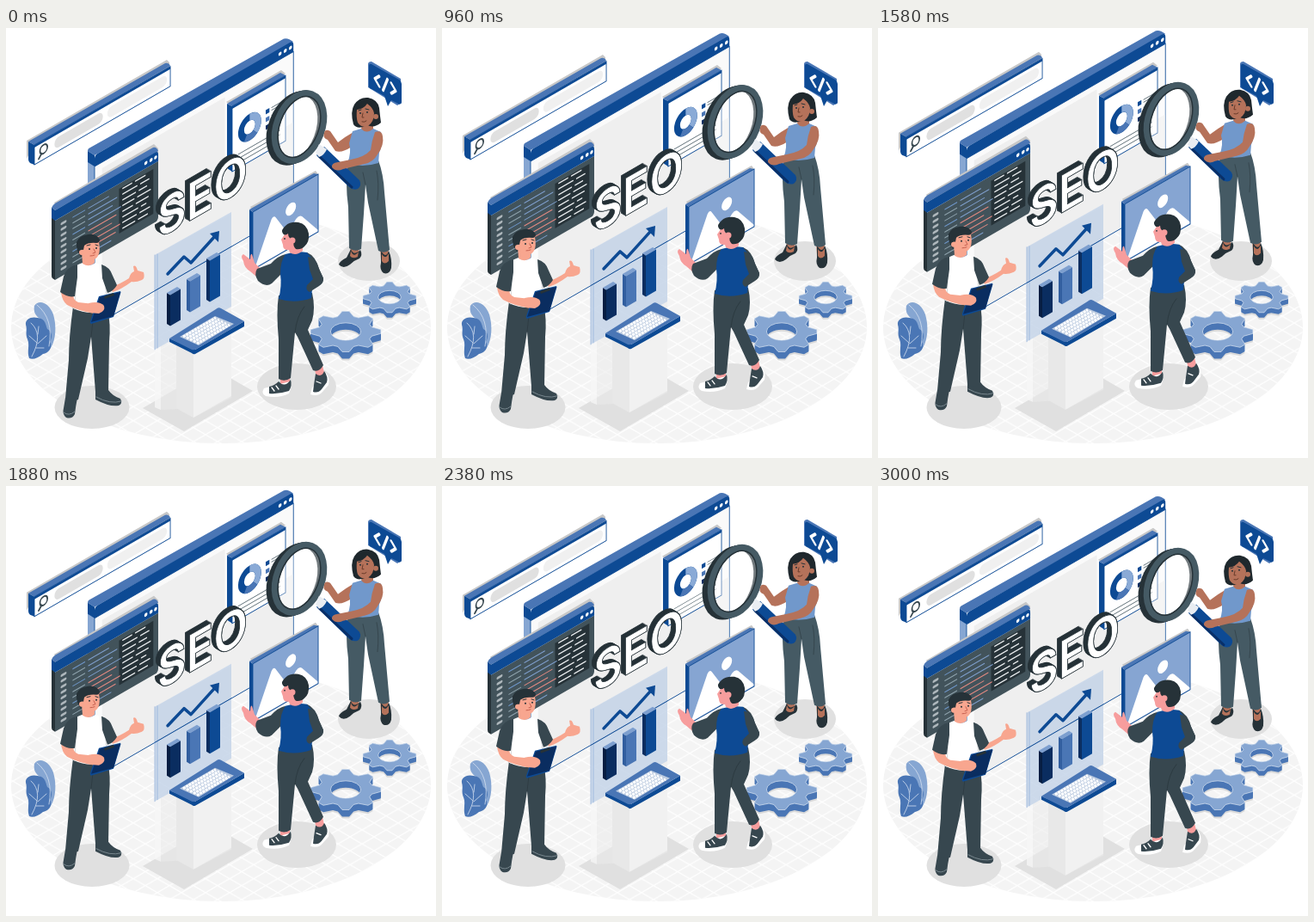
Recreate the animation shown at these times as an HTML page. Size 500 px wide and 500 px high, loop 3.04 s.

```html
<!DOCTYPE html>
<html lang="en">
<head>
<meta charset="utf-8">
<title>Floating SEO team</title>
<style>
html, body { margin: 0; width: 100%; height: 100%; overflow: hidden; background: #fff }
svg { display: block; width: 100vw; height: 100vh }
.b { fill: #0d4a94 } .m { fill: #4a76b5 } .l { fill: #86a6d2 } .n { fill: #0a2d60 }
.d { fill: #37474f } .k { fill: #263238 } .g { fill: #c7c7c7 } .s { fill: #e0e0e0 } .w { fill: #fff }
.peach { fill: #f8a68f } .pink { fill: #f79d9d } .brown { fill: #b5725a }
.edge { stroke: #0d4a94; stroke-width: 1 }
.line { fill: none; stroke-linecap: round; stroke-linejoin: round }
.ink { stroke: #263238; stroke-width: 1 }
.seo { font: 600 60px Inter, Arial, sans-serif }
</style>
</head>
<body>
<svg viewBox="0 0 500 500">
<defs>
  <pattern id="grid" width="28" height="16.2" patternUnits="userSpaceOnUse" x="8" y="3">
    <path d="M0 0L28 16.2M28 0L0 16.2" stroke="#fff" stroke-width="1.1"/>
  </pattern>
</defs>

<ellipse cx="250" cy="348" rx="244" ry="135" fill="#f4f4f4"/>
<ellipse cx="250" cy="348" rx="244" ry="135" fill="url(#grid)"/>
<g class="s">
  <ellipse cx="100" cy="441" rx="43.500" ry="25"/>
  <ellipse cx="338" cy="417" rx="46" ry="27"/>
  <ellipse cx="422" cy="271" rx="36" ry="23"/>
  <path d="M159 442L207 469L287 422L240 395Z"/>
</g>

<g id="gears"></g>

<g id="plant">
  <path class="l" d="M33 323C38 315 50 319 55 333C59 347 58 362 52 372L47 374C50 355 44 340 38 337C33 333 32 328 33 323Z"/>
  <path class="m" d="M27 384C24 376 28 369 25 362C22 355 25 351 23 345C22 338 30 335 37 337C46 338 46 345 48 350C54 353 54 360 51 365C55 372 49 378 43 379C37 384 31 386 27 384Z"/>
  <path class="line" d="M29 343Q44 356 30 382M37 356L38 347M37 367L47 358M35 372L44 372M36 366L27 358M36 322Q56 338 50 370" stroke="#d5e0f0" stroke-width=".8"/>
</g>

<g id="bubble">
  <path class="m" d="M421 42Q421 39 425 39L459 59L460 87L455 90L421 69Z"/>
  <path class="b" d="M422 44Q422 41 425 42L457 60Q460 62 460 65V85Q460 90 456 88L448 84L444 91L440 79L425 71Q422 70 422 67Z"/>
  <path class="line" transform="matrix(.866 .5 0 1 441 66)" d="M-8 -6L-14 0L-8 6M8 -6L14 0L8 6M3 -8L-3 8" stroke="#fff" stroke-width="3.200"/>
</g>

<g id="float">
  <!-- browser window -->
  <path class="l" d="M95 143L103 148V346L95 341Z"/>
  <path class="b" d="M95 143L103 148V161L95 156Z"/>
  <path class="m" d="M103 148L95 143Q95 140 98 139L323 12.500Q328 11 334 16Z"/>
  <g transform="matrix(.866 -.5 0 1 103 148)">
    <path class="edge" fill="#fafafa" d="M0 13H267V198H0Z"/>
    <path fill="#efefef" d="M10 20H175V95H266V197H10Z"/>
    <path class="b" d="M0 13V4Q0 0 4 0H262Q267 0 267 5V13Z"/>
    <g class="w"><circle cx="249" cy="6.500" r="2.100"/><circle cx="256" cy="6.500" r="2.100"/><circle cx="263" cy="6.500" r="2.100"/></g>
  </g>

  <!-- search bar -->
  <path class="g" d="M24 131L187 37L190 40V48L30 140L24 152Z"/>
  <path class="b" d="M26 132L33 136V159L28 157Q26 155 26 153Z"/>
  <path class="m" d="M26 132L185 41Q189 40 191 44L33 136Z"/>
  <g transform="matrix(.866 -.5 0 1 33 136)">
    <path class="w edge" d="M0 0H182.500V23H0Z"/>
    <path class="b" d="M0 0H182.500V3H0Z"/>
    <rect class="s" x="27" y="6.500" width="65" height="12.500" rx="6"/>
    <rect x="98" y="6.500" width="80" height="12.500" rx="6" fill="#f0f0f0"/>
    <circle cx="12.500" cy="11" r="5" fill="none" stroke="#37474f" stroke-width="2"/>
    <path class="line" d="M9.500 15L6 19" stroke="#37474f" stroke-width="2.500"/>
  </g>

  <!-- chart card -->
  <path class="g" d="M256 86L320 49L325 53L263 91Z"/>
  <path class="b" d="M257 88L263 91V167L257 163Z"/>
  <path class="m" d="M257 88L319 52L325 55L263 91Z"/>
  <g transform="matrix(.866 -.5 0 1 263 91)">
    <path class="w edge" d="M0 0H71.600V76H0Z"/>
    <path class="b" d="M0 0H71.600V3H0Z"/>
    <g fill="none" stroke-width="8">
      <circle cx="23.500" cy="36" r="11.500" stroke="#0d4a94"/>
      <path d="M23.500 24.500A11.500 11.500 0 0 1 31 44.700" stroke="#8aaad6"/>
      <path d="M31 44.700A11.500 11.500 0 0 1 18 46" stroke="#4a76b5"/>
    </g>
    <path class="b" d="M45 27h5v5h-5z"/><path class="m" d="M45 36h5v5h-5z"/><path class="n" d="M45 45h5v5h-5z"/>
    <path class="line" d="M53 28H67M53 31H63M53 37H67M53 40H64M53 46H67M53 49H62M8 60H64M8 65H64M8 70H52" stroke="#62727a" stroke-width=".9"/>
  </g>

  <!-- code window -->
  <path class="g" d="M56 203L172 135L177 140V150L60 210Z"/>
  <path class="k" d="M53 209L57 212V293L54 291Q53 290 53 288Z"/>
  <path class="b" d="M53 209L57 212V224L53 221Z"/>
  <path class="m" d="M57 212L53 209Q54 206 57 204L171 139Q175 138 177 143Z"/>
  <g transform="matrix(.866 -.5 0 1 57 212)">
    <path fill="#42535b" d="M0 12H138.600V77Q138 81 135 81H0Z"/>
    <path class="b" d="M0 0H135Q138.600 0 138.600 4V12H0Z"/>
    <g class="w"><circle cx="122" cy="6" r="2.100"/><circle cx="129" cy="6" r="2.100"/><circle cx="135" cy="6" r="2"/></g>
    <path class="k" d="M86 18h46v52h-46z"/>
    <g id="code" class="line"></g>
  </g>

  <!-- image card -->
  <path class="g" d="M284 208L360 166L363 170L287 214Z"/>
  <path class="b" d="M283 211L287 214V281L283 278Z"/>
  <path class="m" d="M283 211L358 169L363 170L287 214Z"/>
  <g transform="matrix(.866 -.5 0 1 287 214)">
    <path class="edge" fill="#86a5d2" d="M0 0H87.800V67H0Z"/>
    <path class="w" d="M3 66L25 21Q28 17 31 22L47 48L58 37Q62 34 66 38L87 64V66Z"/>
    <circle class="w" cx="51" cy="22" r="7"/>
  </g>

  <!-- stand -->
  <path fill="#ececec" fill-opacity=".55" d="M173 264L262 216V430L218 453L200 443L180 444L173 441Z"/>
  <path fill="#f1f1f1" d="M218 372L262 346V428L218 453Z"/>
  <path fill="#e8e8e8" d="M198 362L218 373V453L198 442Z"/>
  <path fill="#fff" fill-opacity=".45" d="M173 373L180 370V444L173 441Z"/>
  <path fill="#a9c4e6" fill-opacity=".5" d="M173 264L262 214V324L173 374Z"/>
  <path class="line" d="M173 264V374M176 263V372" stroke="#98b4dc" stroke-width=".8"/>
  <path class="line" d="M173 305.600L262 254.200" stroke="#0d4a94"/>
  <g id="bars"></g>
  <path class="line" d="M188 286L207 266L215 273L243 242" stroke="#0d4a94" stroke-width="3.500" stroke-linejoin="miter"/>
  <path class="b" d="M237 239L248 236L247 249Z"/>
  <path class="b" d="M190 361L220 374L277 341V347L220 379Q218 380 216 378L190 365Z"/>
  <path class="m" d="M190 361L244 327Q247 324 250 326L277 341L222 373Q219 375 216 374Z"/>
  <path fill="#bccbe0" d="M202 359L243 335L265 344L224 369Z"/>
  <path d="M206 359L244 337M210 361L248 339M214 363L252 341M218 365L256 343M222 367L260 345" fill="none" stroke="#fff" stroke-width="3" stroke-dasharray="3 .8"/>

  <g id="seo" class="seo"></g>

  <!-- man -->
  <path class="peach" d="M121 302Q134 297 143 291Q145 284 149 283L148 277Q151 275 153 282L160 284Q162 291 158 293Q151 296 146 295Q134 304 124 307Z"/>
  <path class="d" d="M69 430L83 430Q81 440 80 449Q77 455 70 453Q65 449 67 442ZM104 422L119 421Q124 428 133 431Q136 437 131 439Q121 441 104 432Z"/>
  <path class="line" d="M67 447Q73 452 80 446M105 429Q121 438 134 434" stroke="#77868d" stroke-width="1"/>
  <path class="d" d="M78 324L118 326Q122 344 120 365L119 423Q111 429 104 423L99 359L95 384L84 432Q76 435 69 431L73 386Q73 360 78 324Z"/>
  <path class="line ink" d="M99 359L101 341" opacity=".5"/>
  <path class="w" d="M89 273Q82 275 79 279L78 326Q97 335 117 328L116 301Q120 291 113 277L104 273Q97 279 89 273Z"/>
  <path class="line" d="M81 304L80 327M116 302Q117 318 116 327" stroke="#d9d9d9" stroke-width="1"/>
  <path class="peach" d="M88 260H103V273Q97 279 89 274Z"/>
  <path class="peach" d="M64 307L79 310Q77 316 84 319L103 321Q114 321 115 327Q113 334 103 332Q84 329 71 322Q65 317 64 307Z"/>
  <path class="d" d="M83 275Q71 277 67 289L63 307Q72 314 80 312L83 290ZM111 275Q121 278 124 288L129 299Q125 306 118 308L112 291Z"/>
  <path class="peach" d="M87 250Q95 244 108 249Q110 260 107 265Q103 271 97 269Q90 267 88 260Z"/>
  <path class="k" d="M88 267Q81 259 82 249Q85 241 96 240Q105 239 109 246Q109 250 105 250Q96 249 91 253L90 258Q86 257 87 262Z"/>
  <circle class="peach" cx="88" cy="261" r="3"/>
  <circle class="k" cx="97" cy="257" r="1"/><circle class="k" cx="105" cy="256" r="1"/>
  <path class="line ink" d="M94 253L98 252M104 252L107 253"/>
  <path class="line" d="M102 257L104 261L101 262M98 265Q101 265 103 264" stroke="#c6604f" stroke-width="1"/>
  <path class="b" d="M108 312L133 306Q134 307 133 309L125 336L99 344Q97 343 98 341Z"/>
  <path class="n" d="M109 313L133 307L125 335L99 342Z"/>
  <path class="k" d="M114 312L125 308L126 311L115 315Z"/>
  <path class="peach" d="M96 320Q109 317 114 323Q116 329 108 332L97 331Z"/>

  <!-- magnifier ring -->
  <g fill="none" transform="rotate(21 341 115)">
    <g stroke="#263238" stroke-width="4">
      <ellipse cx="335.500" cy="119" rx="27.500" ry="42.500"/>
      <ellipse cx="337.500" cy="117.500" rx="27.500" ry="42.500"/>
      <ellipse cx="339.500" cy="116" rx="27.500" ry="42.500"/>
    </g>
    <ellipse cx="341" cy="115" rx="26" ry="40.500" fill="#fff" fill-opacity=".35" stroke="#455a64" stroke-width="8"/>
    <ellipse cx="341" cy="115" rx="22.500" ry="37" stroke="#263238" stroke-width="1.500"/>
  </g>

  <!-- woman -->
  <path class="brown" d="M404 121Q395 126 386 133L377 120Q371 117 370 122Q368 128 374 130L383 143Q390 146 402 138Z"/>
  <path class="brown" d="M401 254L411 255L409 266L400 266ZM435 255H445L444 270H436Z"/>
  <path class="k" d="M401 257Q404 266 412 258Q415 264 411 268Q405 270 400 275Q392 281 387 275Q388 271 396 267ZM436 259Q442 269 445 259Q449 268 448 279Q446 287 439 285Q434 281 436 273Z"/>
  <path class="brown" d="M401 259Q404 268 410 260L409 266Q403 269 400 265ZM437 263Q441 270 445 262V271Q440 276 437 271Z"/>
  <path fill="#455a64" d="M398 155L433 154Q439 170 440 191L446 258Q440 263 433 259L421 203L418 182L416 216L413 257Q406 261 399 256L398 208Q394 180 398 155Z"/>
  <path class="line ink" d="M418 182L415 168M431 166Q434 180 432 200" opacity=".5"/>
  <path class="brown" d="M414 107H427V118Q424 126 413 119Z"/>
  <path fill="#7198cb" d="M403 120L413 117Q419 124 427 117L436 121Q439 134 434 145L433 157Q414 163 397 157Q402 145 399 134Z"/>
  <path fill="#1f282d" d="M404 112Q400 97 405 89Q411 80 421 81Q432 83 434 93Q435 103 436 110Q428 117 420 113Q409 119 404 112Z"/>
  <path class="brown" d="M408 95Q416 94 420 88Q427 93 428 99Q428 109 421 114Q414 117 409 110Q407 104 408 95Z"/>
  <circle class="brown" cx="430" cy="103" r="3"/>
  <circle class="k" cx="412" cy="99" r="1"/><circle class="k" cx="420" cy="98" r="1"/>
  <path class="line ink" d="M410 96L413 95M418 94L422 95"/>
  <path class="line" d="M415 99L414 104L416 104M414 109Q417 110 419 108" stroke="#693b2a" stroke-width="1"/>

  <!-- magnifier handle, held in front -->
  <path class="b" d="M370 138L411 177Q414 183 409 187Q404 189 399 185L361 148Z"/>
  <path class="line" d="M364 149L402 185" stroke="#082f68" stroke-width="3"/>
  <path fill="#e9edf2" d="M364 135L373 141Q370 148 364 150L360 145Z"/>
  <path class="brown" d="M429 121Q437 118 438 126Q440 136 432 147Q427 156 417 158L392 164Q384 168 379 162Q378 157 386 156L401 153Q417 150 424 142Q425 132 429 121Z"/>

  <!-- person at the image card -->
  <path class="pink" d="M319 401H330V416L319 418ZM358 390L367 388L371 405L361 408Z"/>
  <path class="w" d="M300 419L330 411Q333 417 329 425Q317 431 302 428Q296 425 300 419ZM372 401Q377 407 375 415L368 423Q363 429 354 426L356 418Z"/>
  <path class="d" d="M317 411Q324 419 331 409Q333 416 329 422Q317 426 306 425L306 417Q312 416 317 411ZM360 402Q367 407 370 399Q375 406 373 412L367 420Q363 425 357 423L358 415Z"/>
  <path class="line" d="M309 418L312 422M314 416L317 420M361 411L366 413" stroke="#fff" stroke-width="1.300"/>
  <path class="d" d="M317 311L356 308Q360 326 356 340L351 351L369 392Q364 401 357 398L339 359L336 354L331 407Q324 412 317 408L317 362Q314 331 317 311Z"/>
  <path class="line ink" d="M336 354Q338 335 347 324" opacity=".6"/>
  <path class="pink" d="M295 279L289 273L286 263Q284 262 284 269L276 263Q272 265 276 271Q277 279 284 283L291 289Z"/>
  <path class="d" d="M325 263Q316 265 308 274L292 280Q288 286 293 294Q302 302 309 297L322 284ZM350 261Q360 265 364 280L369 291Q369 297 363 300L351 307L347 300L356 291L350 282Z"/>
  <path class="b" d="M325 263Q337 259 350 261L357 270V293L355 314Q336 321 317 315Q321 300 319 286Q319 271 325 263Z"/>
  <path class="d" d="M351 266Q361 267 364 280L369 291Q370 296 364 300L353 307Q348 305 350 299L357 292L353 281Z"/>
  <path class="pink" d="M328 234H345V259Q337 266 330 261L329 258Q322 259 322 252L320 246Z"/>
  <path class="k" d="M322 239Q319 235 325 230Q330 225 340 226Q350 228 352 239Q353 249 347 254Q343 258 337 257Q333 253 335 247Q328 245 328 239Q324 242 322 239Z"/>
  <circle class="pink" cx="333" cy="247" r="3.500"/>
  <circle class="k" cx="324" cy="245" r=".9"/>
</g>
</svg>

<script>
const $ = id => document.getElementById(id);
const range = n => [...Array(n).keys()];

// Text rows: a margin mark, two code runs and a list on the right
$('code').innerHTML = range(9).map(i => {
  const y = 20 + i * 6.6, a = 30 + i * 17 % 17, b = 60 + i * 11 % 17;
  const red = i > 3 && i < 8;
  const row = (x, end, color, w) => `<path d="M${x} ${y}H${end}" stroke="${color}" stroke-width="${w}"/>`;
  return row(9, 14, '#aeb7bc', 3) +
    row(24, a + 10, i % 3 ? '#90a4ae' : '#6f97ca', 1.2) +
    row(a + 15, b + 12, red ? '#e58a82' : '#7f9fcd', 1.2) +
    (i < 8 ? row(91, 103 + i * 7 % 9, '#eceff1', 1.5) + row(108 + i * 7 % 9, 121 + i * 5 % 8, '#eceff1', 1.5) : '');
}).join('');

// Extruded lettering on the wall plane
const word = (dx, dy, style) =>
  `<text transform="matrix(.866 -.5 0 1 ${176 + dx} ${246 + dy})" ${style}>SEO</text>`;
$('seo').innerHTML = range(6).map(i => word(i - 5, (i - 5) * .58, 'fill="#263238" stroke="#263238"')).join('') +
  word(0, 0, 'fill="#fff" stroke="#263238" stroke-width=".8"');

const bar = (x, y, h, front, side) => `
  <path fill="${side}" d="M${x} ${y}l4 2.500v${h}l-4 -2.500z"/>
  <path fill="#7d9fcf" d="M${x} ${y}l12 -7l4 2.500l-12 7z"/>
  <path fill="${front}" d="M${x + 4} ${y + 2.5}l12 -7v${h}l-12 7z"/>`;
$('bars').innerHTML = bar(187, 308, 36, '#0a2d60', '#061d42') +
  bar(210, 292, 36, '#4a76b5', '#315e9f') + bar(233, 268, 48, '#0d4a94', '#0a2d60');

// Flat cog with a hole, stacked downwards for its thickness
function gear(cx, cy, r, teeth, depth) {
  const rim = range(teeth * 4).map(i => {
    const a = (i - .5) * Math.PI / 2 / teeth, q = i % 4 < 2 ? r : r * .77;
    return `${cx + q * Math.cos(a)} ${cy + q * .577 * Math.sin(a)}`;
  }).join('L');
  const h = r * .43, v = h * .577;
  const d = `M${rim}ZM${cx - h} ${cy}a${h} ${v} 0 1 0 ${2 * h} 0a${h} ${v} 0 1 0 ${-2 * h} 0Z`;
  const layer = (dy, style) => `<path d="${d}" fill-rule="evenodd" transform="translate(0 ${dy})" ${style}/>`;
  return layer(depth + 2, 'fill="#d9d9d9"') +
    range(depth + 1).map(i => layer(depth - i, 'fill="#4a76b5"')).join('') +
    layer(0, 'fill="#86a6d2" stroke="#dfe8f4" stroke-width=".7"');
}
$('gears').innerHTML = gear(446, 313, 31, 8, 6) + gear(395, 353, 41, 8, 8);

const LOOP = 3040, RISE = 9.6;
function draw(now) {
  const p = now % LOOP / LOOP;
  const lift = RISE * (1 - Math.abs(1 - 2 * p));
  $('float').setAttribute('transform', `translate(0 ${-lift})`);
  requestAnimationFrame(() => draw(performance.now()));
}
draw(0);
</script>
</body>
</html>
```
